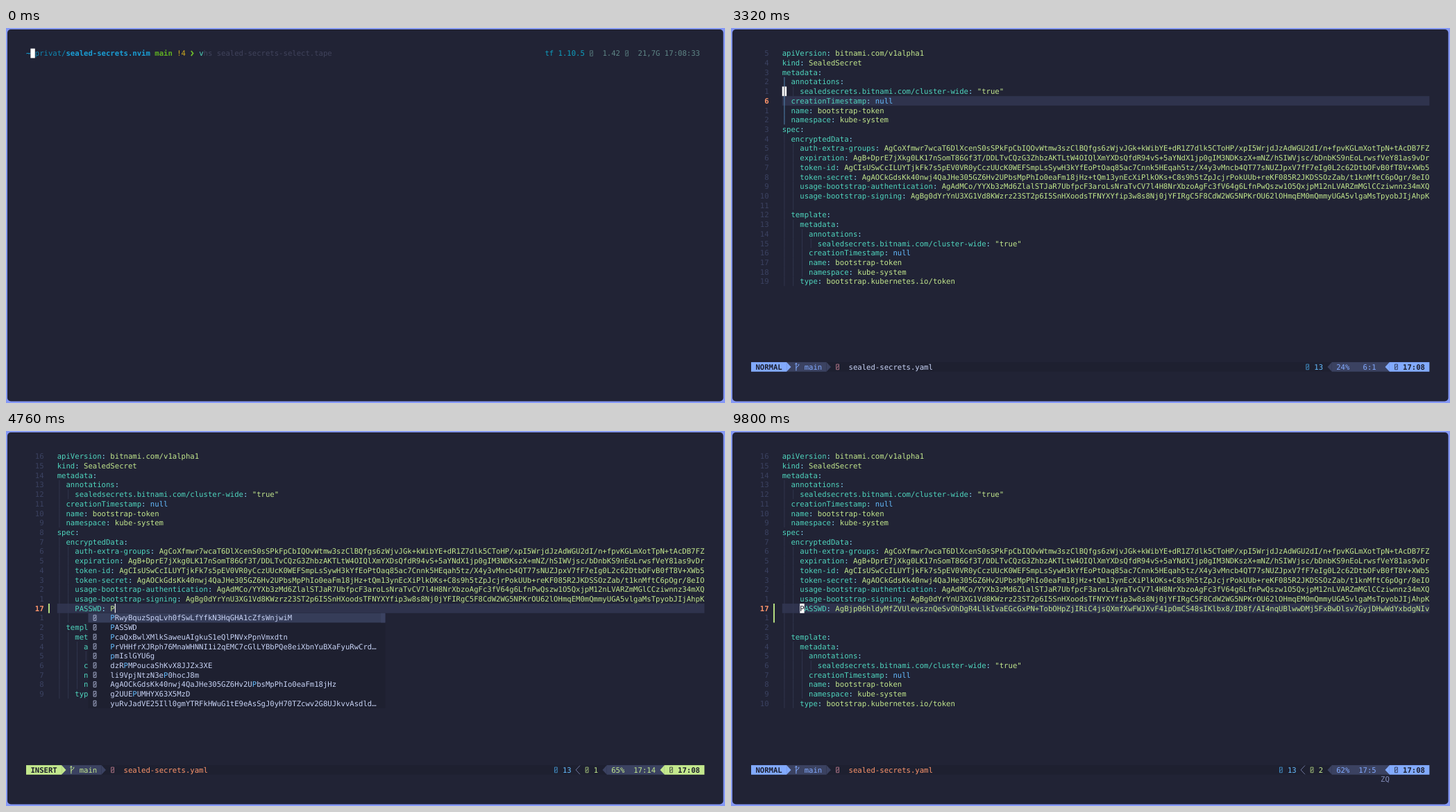
An HTML page that plays this animation: 1036 by 541 pixels, repeating every 9.84 s.

```html
<!DOCTYPE html>
<html lang="en">
<head>
<meta charset="utf-8">
<title>Terminal session</title>
<style>
html, body { margin: 0; width: 100%; height: 100%; overflow: hidden; background: #8598f5; }
svg { display: block; width: 1036px; height: 541px; }
text { font: 10.61px "DejaVu Sans Mono", monospace; white-space: pre; text-rendering: geometricPrecision; font-variant-ligatures: none; }
.b { font-weight: bold; }
.i { font-style: italic; }
</style>
</head>
<body>
<svg viewBox="0 0 1036 541">
  <rect width="1036" height="541" fill="#8598f5"/>
  <rect x="2" y="2" width="1031.5" height="536.5" rx="5" fill="#212335"/>
  <g id="screen"></g>
</svg>
<script>
const LOOP = 9840, TICK = 40;
const CW = 6.388, RH = 13.71, X0 = 29, Y0 = 29.65, COLS = 153;
const C = {
  bg: '#212335', dark: '#1e2030', fg: '#c8d3f5', gutter: '#3b4261', line: '#2f334d', ink: '#1b1d2b',
  blue: '#82aaff', sky: '#65bcff', cyan: '#86e1fc', teal: '#4fd6be', green: '#c3e88d', punct: '#89ddff',
  orange: '#ff966c', purple: '#c099ff', dim: '#636da6', soft: '#828bb8', select: '#2d3f76',
  info: '#0db9d7', border: '#22505f', ghost: '#2c3046', pick: '#363d59'
};
const MODES = { NORMAL: C.blue, INSERT: C.green, 'V-BLOCK': C.purple };

const file = [
  'apiVersion: bitnami.com/v1alpha1',
  'kind: SealedSecret',
  'metadata:',
  '  annotations:',
  '    sealedsecrets.bitnami.com/cluster-wide: "true"',
  '  creationTimestamp: null',
  '  name: bootstrap-token',
  '  namespace: kube-system',
  'spec:',
  '  encryptedData:',
  '    auth-extra-groups: AgCoXfmwr7wcaT6DlXcenS0sSPkFpCbIQOvWtmw3szClBQfgs6zWjvJGk+kWibYE+dR1Z7dlk5CToHP/xpI5WrjdJzAdWGU2dI/n+fpvKGLmXotTpN+tAcDB7FZ',
  '    expiration: AgB+DprE7jXkg0LK17nSomT86Gf3T/DDLTvCQzG3ZhbzAKTLtW4OIQlXmYXDsQfdR94vS+5aYNdX1jp0gIM3NDKszX+mNZ/hSIWVjsc/bDnbKS9nEoLrwsfVeY81as9vDr',
  '    token-id: AgCIsUSwCcILUYTjkFk7s5pEV0VR0yCczUUcK0WEFSmpLsSywH3kYfEoPtOaq85ac7Cnnk5HEqah5tz/X4y3vMncb4QT77sNUZJpxV7fF7eIg0L2c62DtbOFvB0fT8V+XWb5',
  '    token-secret: AgAOCkGdsKk40nwj4QaJHe305GZ6Hv2UPbsMpPhIo0eaFm18jHz+tQm13ynEcXiPlkOKs+C8s9h5tZpJcjrPokUUb+reKF085R2JKDSSOzZab/t1knMftC6pOgr/8eIO',
  '    usage-bootstrap-authentication: AgAdMCo/YYXb3zMd6ZlalSTJaR7UbfpcF3aroLsNraTvCV7l4H8NrXbzoAgFc3fV64g6LfnPwQszw1O5QxjpM12nLVARZmMGlCCziwnnz34mXQ',
  '    usage-bootstrap-signing: AgBg0dYrYnU3XG1Vd8KWzrz23ST2p6I5SnHXoodsTFNYXYfip3w8s8Nj0jYFIRgC5F8CdW2WG5NPKrOU62lOHmqEM0mQmmyUGA5vlgaMsTpyobJIjAhpK',
  '',
  '  template:',
  '    metadata:',
  '      annotations:',
  '        sealedsecrets.bitnami.com/cluster-wide: "true"',
  '      creationTimestamp: null',
  '      name: bootstrap-token',
  '      namespace: kube-system',
  '    type: bootstrap.kubernetes.io/token'
];
const sealed = '    PASSWD: AgBjp06hldyMfZVUlevsznQeSvOhDgR4LlkIvaEGcGxPN+TobOHpZjIRiC4jsQXmfXwFWJXvF41pOmCS48sIKlbx8/ID8f/AI4nqUBlwwDMj5FxBwDlsv7GyjDHwWdYxbdgNIv';
const entry = 'PASSWD: P@ssWord';
const command = 'v sealed-secrets.yaml';
const updates = ['grug-far.nvim', 'avante.nvim', 'sealed-secrets.nvim', 'nvim-lspconfig', 'yazi.nvim',
  'render-markdown.nvim', 'SchemaStore.nvim', 'nvim-treesitter', 'catppuccin', 'ts-comments.nvim',
  'blink.cmp', 'snacks.nvim', 'nvim-treesitter-textobjects'];

// A star marks the next letter as matched.
const listP = [
  '*PRwyBquzSpqLvh0fSwLfYfkN3HqGHA1cZfsWnjwiM', '*PASSWD', '*PcaQxBwlXMlkSaweuAIgkuS1eQlPNVxPpnVmxdtn',
  '*PrVHHfrXJRph76MnaWHNNI1i2qEMC7cGlLYBbPQe8eiXbnYuBXaFyuRwCrd…', '*pmIslGYU6g', 'dzR*PMPoucaShKvX8JJZx3XE',
  'li9VpjNtzN3e*P0hocJ8m', 'AgAOCkGdsKk40nwj4QaJHe305GZ6Hv2U*PbsMpPhIo0eaFm18jHz', 'g2UUE*PUMHYX63X5MzD',
  'yuRvJadVE25Ill0gmYTRFkHWuG1tE9eAsSgJ0yH70TZcwv2G8UJkvvAsdld…'];
const listPA = [
  '*Pc*aQxBwlXMlkSaweuAIgkuS1eQlPNVxPpnVmxdtn', 'lUqpbsAVp1IZUix4GFpddRCmt9e6FukcSaFvoI2KabzdgLXyoiG5E49q8Ia…',
  'usage-bootstra*p-*authentication', 'names*p*ace', 'JlyZYu2DwDcHFX9AruCScF6JyjHDQHDlPo5gGqXnI1ItmKkCF*PXy*AvmzPdT…',
  'oI2i6YVz*PL9E05P*K*aEy32TufvVMp4vEVWefRwT', 'v1al*ph*a1', 'tem*pl*ate',
  'Hce1mYZNUSpXe9X8bs9WB8YhYS9txJLVsruo*P5zZ*Au1NmDjwbhko3q5aYuS…', 'dzR*PM*Pouc*aShKvX8JJZx3XE'];
const menus = {
  1: { col: 6, items: listP.filter(s => s !== '*PASSWD'), thumb: 1 },
  2: { col: 6, items: listPA, thumb: 5 },
  3: { col: 6, items: ['*Pc*aQxBwlXMlk*SaweuAIgkuS1eQlPNVxPpnVmxdtn', 'dzRPM*Pouc*a*ShKvX8JJZx3XE'] },
  9: { col: 14, items: listP, thumb: 1 },
  11: { col: 16, items: ['*spec', 'name*space', 'u*sage-bootstrap-signing', 'kube-*system', 'annotation*s', 'token-*secret'] },
  12: { col: 16, items: ['u*sage-boot*strap-signing', 'kube-*sy*stem'] }
};
const leaders = ['a +ai', 'b +buffer', 'c +code', 'f +file/find', 'g +git', 'k +kubeseal',
  'q +quit', 's +search', 't +test', 'u +ui', 'w +windows', 'x +workspace'];

const screen = document.getElementById('screen');
let out = '';
const px = c => X0 + c * CW, py = r => Y0 + r * RH, mid = r => py(r) + RH / 2;
const esc = s => s.replace(/&/g, '&amp;').replace(/</g, '&lt;');
const range = (n, f) => Array.from({ length: n }, (_, i) => f(i));

function box(r, c, n, fill, rows = 1) {
  out += `<rect x="${px(c)}" y="${py(r)}" width="${n * CW}" height="${rows * RH}" fill="${fill}"/>`;
}
function put(r, c, s, fill, cls = '') {
  s = s.slice(0, COLS - c);
  if (s.trim()) out += `<text x="${px(c)}" y="${py(r) + 10.7}" fill="${fill}" class="${cls}">${esc(s)}</text>`;
}
function path(d, stroke, width = 1, fill = 'none') {
  out += `<path d="${d}" stroke="${stroke}" stroke-width="${width}" fill="${fill}"/>`;
}
function tofu(r, c, color) {
  const x = px(c) + 1.3, y = mid(r) - 3.8;
  path(`M${x} ${y}h3.8v7.6h-3.8zM${x + .9} ${y + 5.8}l2-4`, color, .75);
}
function wedge(r, c, dir, color) {
  const x = px(dir > 0 ? c : c + 1);
  path(`M${x} ${py(r)}l${dir * CW} ${RH / 2}l${-dir * CW} ${RH / 2}z`, 'none', 0, color);
}
function vline(r, c, color) {
  path(`M${px(c + .5)} ${py(r)}v${RH}`, color, .8);
}
function cursor(r, c, ch = ' ') {
  box(r, c, 1, '#fff');
  if (ch === '|') vline(r, c, C.ink); else put(r, c, ch, C.ink);
}

function shell(t) {
  const n = t < 120 ? 1 : Math.min(command.length, Math.floor((t - 40) / 80) + 1);
  put(0, 0, '~/privat/', '#0f86b0');
  put(0, 0, '~', '#1a9fd6');
  put(0, 9, 'sealed-secrets.nvim', '#1a9fd6', 'b');
  put(0, 29, 'main', '#5faf22', 'b');
  put(0, 34, '!4', '#d0ab1e');
  path(`M${px(37) + 1.4} ${mid(0) - 3.6}l2.8 3.6l-2.8 3.6`, '#6fbf2a', 1.7);
  put(0, 39, 'v', C.teal);
  put(0, 40, command.slice(1, n), C.fg);
  put(0, 39 + n, n > 1 ? command.slice(n) : 'hs sealed-secrets-select.tape', '#40435c');
  const mute = '#5f8787';
  put(0, 117, 'tf 1.10.5', '#0d9fc0');
  tofu(0, 127, mute);
  put(0, 130, '1.42', mute);
  tofu(0, 135, mute);
  put(0, 138, '21,7G 17:08:33', mute);
  if (t < 40) cursor(0, 1);
  else cursor(0, 39 + n, n > 1 ? command[n] : 'h');
}

function yaml(r, s, plain) {
  const m = s.match(/^( *)([^:]+):(.*)$/), pad = s.search(/\S/);
  if (plain) return put(r, 7 + Math.max(pad, 0), s.trim(), C.fg);
  if (!m) return put(r, 7 + Math.max(pad, 0), s.trim(), C.green);
  const c = 7 + m[1].length, end = c + m[2].length, v = m[3].trim();
  put(r, c, m[2], C.teal);
  put(r, end, ':', C.punct);
  put(r, end + 2, v, v === 'null' ? C.sky : C.green);
}

function guides(r, s, scoped) {
  const depth = s.trim() ? s.search(/\S/) : 4;
  for (let k = 0; k < depth; k += 2) vline(r, 7 + k, scoped && k === 0 ? '#5f9fd0' : '#353a55');
}

function statusBar(st) {
  const m = st.mode, hue = MODES[m], n = m.length + 2, r = 33;
  box(r, 0, COLS, C.dark);
  box(r, 0, n, hue);
  put(r, 1, m, C.ink, 'b');
  box(r, n, 9, C.gutter);
  wedge(r, n, 1, hue);
  const bx = px(n + 2), by = mid(r);
  path(`M${bx + 1} ${by - 5.5}v11M${bx + 1} ${by + 2}q0 -2 2 -2.6q2 -.6 2 -3.6M${bx - .5} ${by - 3.5}l1.5 -2l1.5 2`, hue, 1);
  put(r, n + 4, 'main', hue);
  wedge(r, n + 9, 1, C.gutter);
  tofu(r, n + 11, '#d58a9c');
  put(r, n + 14, 'sealed-secrets.yaml', st.total > 25 ? C.orange : C.fg);

  const c = st.diff ? 119 : 125;
  tofu(r, c, '#4aa9e8');
  put(r, c + 2, '13', C.sky);
  if (st.diff) {
    path(`M${px(125) - .5} ${py(r) + .5}L${px(124)} ${mid(r)}L${px(125) - .5} ${py(r + 1) - .5}`, C.soft, .8);
    tofu(r, 126, C.green);
    put(r, 128, '' + st.diff, C.green);
  }
  wedge(r, 130, -1, C.gutter);
  box(r, 131, 13, C.gutter);
  put(r, 132, st.line === 1 ? 'Top' : Math.floor(st.line / st.total * 100) + '%', hue);
  put(r, 139 - ('' + st.line).length, st.line + ':' + st.col, hue);
  wedge(r, 143, -1, hue);
  box(r, 144, 9, hue);
  tofu(r, 145, C.ink);
  put(r, 147, '17:08', C.ink, 'b');
}

function notice(title, rows) {
  const a = 110, b = 151, start = Math.floor((a + b - title.length - 4) / 2) + 1;
  const top = mid(1), bottom = mid(rows + 2), l = px(a + .5), r = px(b + .5);
  box(1, a, 42, C.bg, rows + 2);
  path(`M${px(start - 1)} ${top}H${l + 2}q-2 0 -2 2V${bottom - 2}q0 2 2 2H${r - 2}q2 0 2 -2V${top + 2}q0 -2 -2 -2H${px(start + title.length + 4)}`, C.border, 1);
  tofu(1, start, C.info);
  put(1, start + 3, title, C.info);
}

function updateNotice() {
  notice('lazy.nvim', 14);
  put(2, 112, '# Plugin Updates', C.blue);
  updates.forEach((s, i) => {
    const r = i + 3, c = 114 + s.length;
    put(r, c, file[r].slice(c - 7, 144), C.ghost);
    put(r, 112, '-', C.orange);
    put(r, 114, s, C.fg);
  });
}

function menu({ col, items, thumb }) {
  const width = thumb ? 67 : Math.max(...items.map(s => s.replace(/\*/g, '').length)) + 7;
  box(17, col, width, C.dark, items.length);
  box(17, col, width, C.pick);
  if (thumb) box(17, col + width - 1, 1, C.gutter, thumb);
  items.forEach((s, i) => {
    const r = 17 + i;
    let c = col + 5;
    tofu(r, col + 1, C.fg);
    s.split(/(\*.)/).forEach(part => {
      const hit = part[0] === '*', word = hit ? part[1] : part;
      put(r, c, word, hit ? C.sky : C.fg);
      c += word.length;
    });
  });
}

function whichKey(sub) {
  const item = (r, c, key, text, hue) => {
    put(r, c, key, C.cyan);
    put(r, c + 2, '→', C.dim);
    put(r, c + 4, text, hue);
  };
  box(28, 0, COLS, C.dark, 5);
  if (sub) item(29, 5, 's', 'Encrypt selection with Kubeseal', C.purple);
  else leaders.forEach((s, i) => item(29 + i % 3, 5 + 38 * Math.floor(i / 3), s[0], s.slice(2), C.blue));
  put(32, 2, '+Visual', C.blue);
  put(32, 10, '»', C.dim);
  tofu(32, 12, C.blue);
  if (sub) {
    put(32, 15, '»', C.dim);
    put(32, 17, 'k', C.blue);
  }
  [[68, 'close', 71], [78, 'back', 80]].forEach(([icon, word, c]) => {
    tofu(32, icon, C.teal);
    put(32, c, word, C.dim);
  });
}

function editor(t) {
  const opened = t >= 3840, done = t >= 7320;
  const mode = opened && t < 5960 ? 'INSERT' : t >= 6000 && !done ? 'V-BLOCK' : 'NORMAL';
  const typed = Math.max(0, Math.min(entry.length, Math.floor((t - 3940) / 100) + 1));
  const line = opened ? 17 : t < 3160 ? 1 : Math.min(16, Math.floor((t - 3160) / 40) + 2);
  const lines = file.slice();
  if (done) lines.splice(16, 0, sealed, '');
  else if (opened) lines.splice(16, 0, '    ' + entry.slice(0, typed));
  const col = !opened ? 1 : done ? 5 : mode === 'V-BLOCK' ? 1 : mode === 'NORMAL' ? 20 : 5 + typed;
  const diff = done ? 2 : t >= 3880 ? 1 : 0;
  const row = line - 1, plain = t < 2040, visual = mode === 'V-BLOCK';

  if (!plain && !visual) box(row, 7, COLS - 7, C.line);
  if (visual) box(16, 7, 20, C.select);
  lines.forEach((s, r) => {
    if (!plain) guides(r, s, line > 2 && line < 9 && r > 2 && r < 8);
    yaml(r, s, plain);
    if (t < 2000) return;
    const num = '' + (r === row ? line : Math.abs(r - row));
    put(r, 4 - num.length, num, r === row ? C.orange : C.gutter, r === row ? 'b' : '');
  });
  if (diff) box(16, 5, .32, '#b3dc80', diff);

  if (visual) put(16, 29, '[<leader>aa: ask, <leader>ae: edit]', C.cyan, 'i');
  const moving = t >= 3160 && t < 3760;
  const at = moving ? row - 1 : row, ch = lines[at][col - 1] || ' ';
  if (mode === 'INSERT') box(row, 6 + col, .18, '#fff');
  else cursor(at, 6 + col, ch === ' ' || !lines[at] ? '|' : ch);

  if (t >= 2080) statusBar({ mode, line, col, total: lines.length, diff });
  if (t >= 2120 && t < 3160) updateNotice();
  if (mode === 'INSERT' && menus[typed]) menu(menus[typed]);
  if (t >= 6040 && t < 7280) whichKey(t >= 6360);
  if (visual) put(34, 142, '1x20', C.dim);
  if (done && t < 8480) {
    notice('sealed-secrets', 1);
    put(2, 112, 'Selection encrypted', C.fg);
  }
  if (t >= 9800) put(34, 142, 'ZQ', C.soft);
}

function render(t) {
  out = '';
  if (t < 1720) shell(t);
  else if (t < 1880) cursor(0, 0);
  else editor(t);
  screen.innerHTML = out;
}

let start = null, last = -1;
function loop(now) {
  if (start === null) start = now;
  const t = Math.floor(((now - start) % LOOP) / TICK) * TICK;
  if (t !== last) render(last = t);
  requestAnimationFrame(loop);
}
render(0);
requestAnimationFrame(loop);
</script>
</body>
</html>
```
